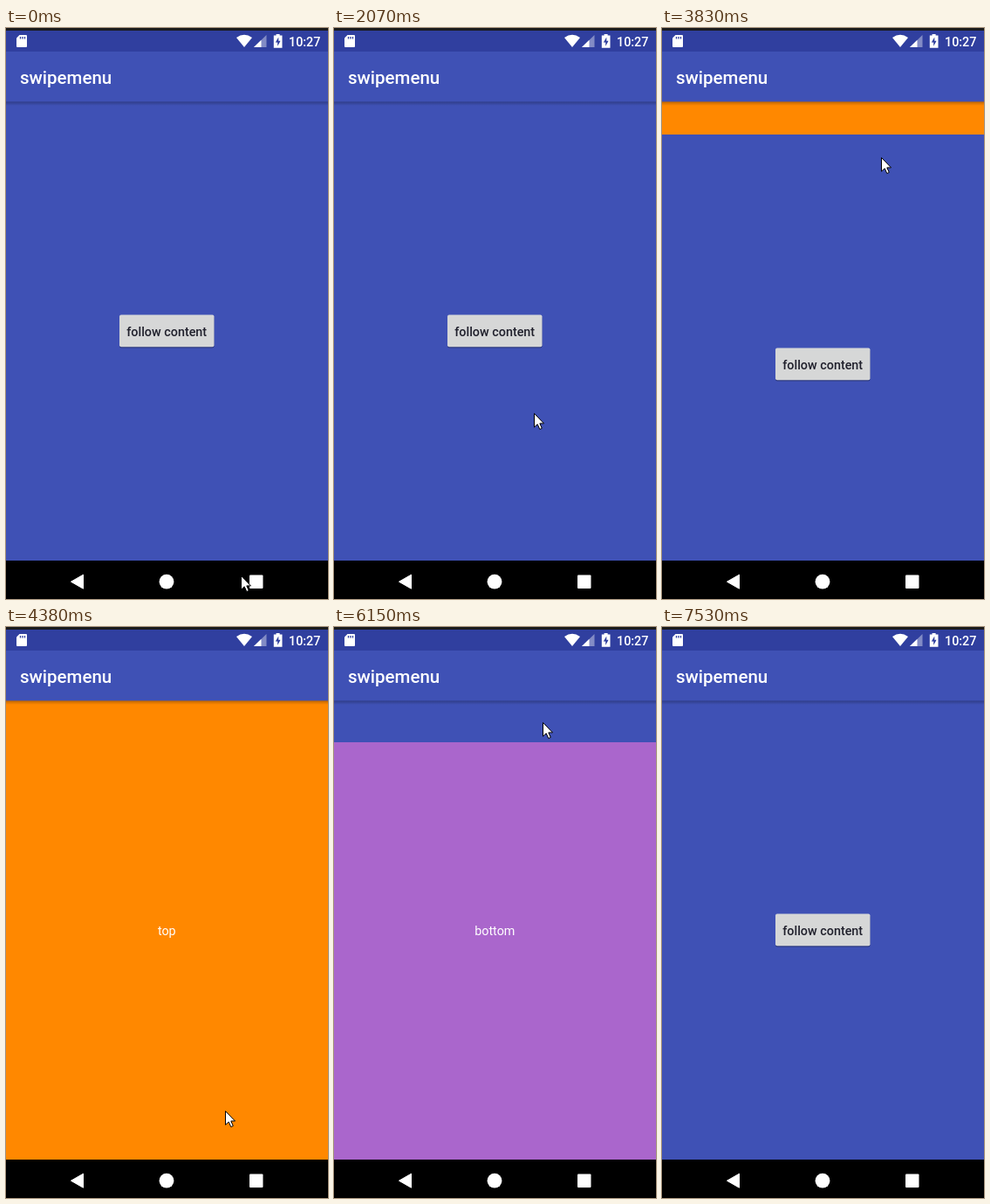
An HTML page for the animation above (7910 ms loop, 369x654 px).

```html
<!DOCTYPE html>
<html lang="en">
<head>
<meta charset="utf-8">
<title>swipemenu</title>
<style>
  html, body { margin: 0; width: 100%; height: 100%; overflow: hidden; background: #000; }
  svg { display: block; width: 100%; height: 100%; }
  text { font: 14.35px Roboto, sans-serif; fill: #fff; }
  .mid { text-anchor: middle; }
  .bold { font-weight: 500; }
  .title { font-size: 20.5px; }
  .dark { fill: #20202c; }
</style>
</head>
<body>
<svg viewBox="0 0 369 654">
  <defs>
    <clipPath id="stage"><rect y="84" width="369" height="526"/></clipPath>
    <linearGradient id="shade" x2="0" y2="1">
      <stop stop-color="#000" stop-opacity=".27"/>
      <stop offset="1" stop-color="#000" stop-opacity="0"/>
    </linearGradient>
  </defs>

  <g clip-path="url(#stage)">
    <rect id="panel" y="84" width="369" height="526" fill="#3f51b5"/>
    <text id="label" class="mid" x="184.3" y="352.6"></text>
    <g id="content">
      <rect y="84" width="369" height="526" fill="#3f51b5"/>
      <rect x="130" y="330" width="108.5" height="36.5" rx="2" fill="#000" opacity=".3"/>
      <rect x="130" y="328.5" width="108.5" height="36.8" rx="2" fill="#d6d7d7"/>
      <text class="mid bold dark" x="184.2" y="352.6">follow content</text>
    </g>
    <rect y="84" width="369" height="5" fill="url(#shade)"/>
  </g>

  <rect width="369" height="3" fill="#1b1b1d"/>
  <rect y="3" width="369" height="24.5" fill="#303f9f"/>
  <rect y="27" width="369" height="57.4" fill="#3f51b5"/>
  <text class="title bold" x="16" y="64">swipemenu</text>

  <g fill="#fff">
    <path d="M15.5 8H23Q24 8 24 9V21Q24 22 23 22H13Q12 22 12 21V11.5Z"/>
    <path d="M264 11Q273 4.6 282 11L273 22Z"/>
    <path d="M298.5 8V22H284Z" opacity=".4"/>
    <path d="M292.5 13.8V22H284Z"/>
    <path d="M309.6 7H313.6V8.6H316.5V22.8H306.8V8.6H309.6Z"/>
  </g>
  <path d="M16.5 10V12.5M19 10V12.5M21.5 10V12.5" stroke="#303f9f" stroke-width="1.3"/>
  <path d="M312.3 10.5L308.8 16.6H311.2V20.8L314.6 14.8H312.3Z" fill="#303f9f"/>
  <text class="bold" x="324" y="20.6">10:27</text>

  <rect y="610" width="369" height="44" fill="#000"/>
  <g fill="#fff">
    <path d="M74.5 634.2L88.5 626.2V642.2Z" stroke="#fff" stroke-linejoin="round"/>
    <circle cx="184" cy="634.2" r="8.4"/>
    <rect x="279" y="626.5" width="15.5" height="15.5" rx="1"/>
  </g>

  <path id="cursor" d="M.5 .5V16.2L4.2 12.8L6.8 18.6L9.3 17.4L6.8 11.9H11.5Z"
        fill="#fff" stroke="#000" stroke-width="1"/>
</svg>
<script>
const LOOP = 7910, STEP = 76.9;
const get = id => document.getElementById(id);
const panel = get("panel"), label = get("label");
const content = get("content"), cursor = get("cursor");

const menus = {
  left: "#669900", right: "#cc0000", top: "#ff8800", bottom: "#aa66cc"
};

const ease = {
  line: p => p,
  both: p => p * p * (3 - 2 * p),
  out: p => 1 - (1 - p) ** 3
};

// rows: time, x, y, easing on the way to this row
const slide = [
  [0, 0, 0], [330, 0, 0], [760, 348, 0, "both"], [920, 369, 0, "out"],
  [1150, 369, 0], [1540, 77, 0, "both"], [1840, 0, 0, "out"],
  [2070, 0, 0], [2380, -209, 0, "both"], [2610, -369, 0, "out"],
  [2680, -369, 0], [2910, -189, 0], [2990, -147, 0], [3300, 0, 0, "out"],
  [3680, 0, 0], [4150, 0, 492, "both"], [4300, 0, 526, "out"],
  [4530, 0, 526], [5000, 0, 72, "both"], [5220, 0, 0, "out"],
  [5600, 0, 0], [6150, 0, -478, "both"], [6300, 0, -526, "out"],
  [6530, 0, -526], [7070, 0, -98, "both"], [7530, 0, 0, "out"]
];
const pointer = [
  [0, 269, 627], [310, 45, 440, "both"], [330, 45, 440],
  [760, 393, 436, "both"], [840, 393, 436], [990, 312, 441, "out"],
  [1150, 312, 441], [1540, 20, 441, "both"], [1920, 229, 441, "both"],
  [2070, 229, 441], [2380, 20, 441, "both"], [2680, 178, 441, "both"],
  [2910, 358, 441], [2990, 400, 441], [3150, 400, 441],
  [3610, 251, 110, "both"], [3680, 251, 110], [4150, 251, 602, "both"],
  [4380, 251, 554, "both"], [4530, 251, 554], [5000, 251, 100, "both"],
  [5540, 239, 587, "both"], [5600, 239, 587], [6150, 239, 109, "both"],
  [6220, 239, 94], [6450, 239, 153, "both"], [6530, 239, 153],
  [7070, 239, 580, "both"]
];
const pointerEnd = 7370;

function at(rows, t) {
  const i = rows.findIndex(r => r[0] > t);
  if (i < 0) return rows[rows.length - 1].slice(1, 3);
  const a = rows[i - 1], b = rows[i];
  const p = ease[b[3] || "line"]((t - a[0]) / (b[0] - a[0]));
  return [1, 2].map(n => Math.round(a[n] + (b[n] - a[n]) * p));
}

const stepTime = k => Math.floor(k * STEP / 10) * 10;

function snap(t) {
  const k = Math.floor((t + 10) / STEP);
  return stepTime(k) > t ? stepTime(k - 1) : stepTime(k);
}

function draw(t) {
  const [x, y] = at(slide, t);
  const [cx, cy] = at(pointer, t);
  const side = x > 0 ? "left" : x < 0 ? "right" : y > 0 ? "top" : y < 0 ? "bottom" : "";
  panel.setAttribute("fill", menus[side] || "#3f51b5");
  label.textContent = side;
  content.setAttribute("transform", `translate(${x} ${y})`);
  cursor.setAttribute("transform", `translate(${cx} ${cy})`);
  cursor.style.display = t < pointerEnd ? "" : "none";
}

const start = performance.now();
function tick(now) {
  draw(snap(Math.max(0, now - start) % LOOP));
  requestAnimationFrame(tick);
}
draw(0);
requestAnimationFrame(tick);
</script>
</body>
</html>
```
